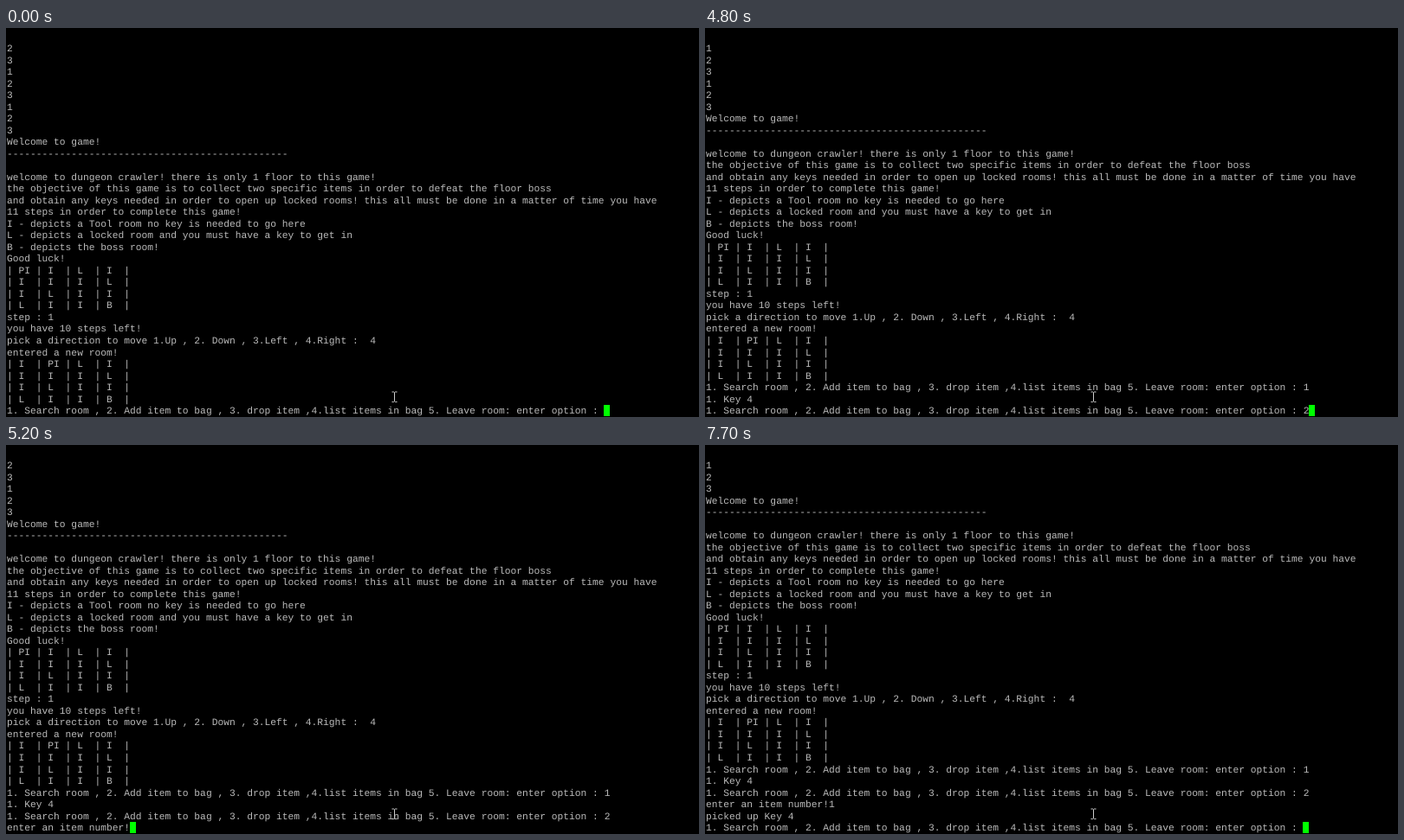
Animation of 800 by 450 pixels, one loop 8 s. Source, as an HTML page:

```html
<!DOCTYPE html>
<html lang="en">
<head>
<meta charset="utf-8">
<title>Dungeon crawler terminal</title>
<style>
  html, body { margin: 0; width: 100%; height: 100%; overflow: hidden; background: #000; }
  #stage { position: relative; width: 800px; height: 450px; overflow: hidden; background: #000; }
  /* Laid out large, then scaled so that cells measure 6.76 x 13.52 */
  #screen {
    position: absolute; left: 0.8px; top: 17.8px; margin: 0;
    font: 20px/24px "Liberation Mono", "Courier New", monospace;
    font-variant-ligatures: none; text-rendering: geometricPrecision;
    color: #bbb; white-space: pre;
    transform-origin: 0 0; transform: scale(0.56333);
  }
  #cursor { position: absolute; left: 0; top: 435.5px; width: 7px; height: 13.8px; background: #0f0; }
  #mouse { position: absolute; left: 444px; top: 420px; }
</style>
</head>
<body>
<div id="stage">
  <pre id="screen"></pre>
  <div id="cursor"></div>
  <svg id="mouse" width="9" height="14" viewBox="0 0 9 14" fill="none" stroke="#ccc">
    <path d="M1.5 1H3.6L4.5 1.7L5.4 1H7.5M4.5 1.5V12M1.5 12.6H3.6L4.5 11.9L5.4 12.6H7.5"/>
  </svg>
</div>
<script>
const LOOP = 8000, ROWS = 32, CELL = 6.76, LEFT = 0.8;
const output = document.getElementById("screen");
const cursor = document.getElementById("cursor");

const grid = rows => rows.map(r => "| " + r.split(" ").map(c => c.padEnd(2)).join(" | ") + " |");
const rest = ["I I I L", "I L I I", "L I I B"];
const menu = "1. Search room , 2. Add item to bag , 3. drop item ,4.list items in bag 5. Leave room: enter option : ";

const intro = [
  ..."23123123",
  "Welcome to game!",
  "-".repeat(48),
  "",
  "welcome to dungeon crawler! there is only 1 floor to this game!",
  "the objective of this game is to collect two specific items in order to defeat the floor boss",
  "and obtain any keys needed in order to open up locked rooms! this all must be done in a matter of time you have",
  "11 steps in order to complete this game!",
  "I - depicts a Tool room no key is needed to go here",
  "L - depicts a locked room and you must have a key to get in",
  "B - depicts the boss room!",
  "Good luck!",
  ...grid(["PI I L I", ...rest]),
  "step : 1",
  "you have 10 steps left!",
  "pick a direction to move 1.Up , 2. Down , 3.Left , 4.Right :  4",
  "entered a new room!",
  ...grid(["I PI L I", ...rest])
];

// Each step: start time and the lines that follow the intro
const ask = "enter an item number!";
const search = [menu + "1", "1. Key 4"];
const add = [...search, menu + "2"];
const steps = [
  [0, [menu]],
  [1200, [menu + "1"]],
  [1300, [...search, menu]],
  [4800, add],
  [5000, [...add, ask]],
  [7500, [...add, ask + "1"]],
  [7600, [...add, ask + "1", "picked up Key 4", menu]]
];

let shown = null;
function draw() {
  const t = performance.now() % LOOP;
  const step = steps.filter(([at]) => at <= t).pop();
  if (step !== shown) {
    shown = step;
    const lines = [...intro, ...step[1]].slice(-ROWS);
    output.textContent = lines.join("\n");
    cursor.style.left = LEFT + lines[ROWS - 1].length * CELL + "px";
  }
  requestAnimationFrame(draw);
}
draw();
</script>
</body>
</html>
```
